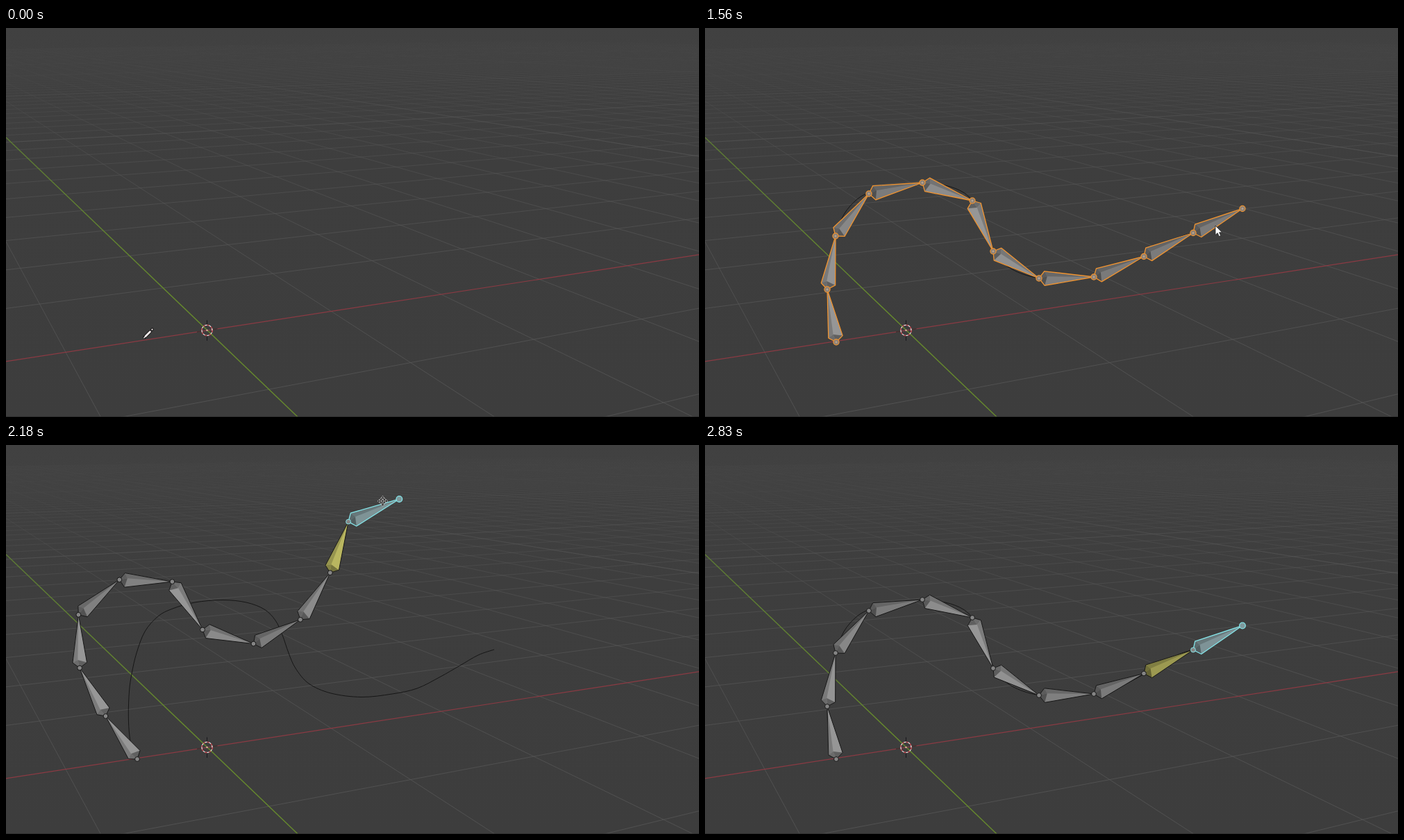
An HTML page that plays this animation: 998x561 px, repeating every 2.92 s.

```html
<!DOCTYPE html>
<html lang="en">
<head>
<meta charset="utf-8">
<title>Rig along curve</title>
<style>
html, body { margin: 0; width: 100%; height: 100%; overflow: hidden; background: #3e3e3e; }
svg { display: block; width: 100vw; height: 100vh; }
#menu text { font: 8.6px Inter, "Open Sans", sans-serif; fill: #e2e2e2; }
#menu .key { fill: #8c8c8c; text-anchor: end; }
#menu .u { text-decoration: underline; }
#menu .icon { fill: none; stroke: #d0d0d0; stroke-width: .9; }
</style>
</head>
<body>
<svg viewBox="0 0 998 561">
  <defs>
    <linearGradient id="sky" x1="0" y1="0" x2="0" y2="1">
      <stop offset="0" stop-color="#414141"/>
      <stop offset=".35" stop-color="#3e3e3e"/>
      <stop offset="1" stop-color="#3d3d3d"/>
    </linearGradient>
    <linearGradient id="fade" gradientUnits="userSpaceOnUse" x1="0" y1="0" x2="0" y2="561">
      <stop offset=".02" stop-color="#565656" stop-opacity="0"/>
      <stop offset=".08" stop-color="#565656" stop-opacity=".08"/>
      <stop offset=".17" stop-color="#565656" stop-opacity=".24"/>
      <stop offset=".3" stop-color="#565656" stop-opacity=".46"/>
      <stop offset=".55" stop-color="#565656" stop-opacity=".68"/>
      <stop offset="1" stop-color="#565656" stop-opacity=".8"/>
    </linearGradient>
    <linearGradient id="green" gradientUnits="userSpaceOnUse" x1="0" y1="158" x2="0" y2="400">
      <stop offset="0" stop-color="#5c7a34"/>
      <stop offset="1" stop-color="#668a2c"/>
    </linearGradient>
  </defs>
  <rect width="998" height="561" fill="url(#sky)"/>
  <g id="grid" fill="none" stroke="url(#fade)"></g>
  <path d="M0 480.8L998 326.9" stroke="#8b3a43" stroke-width="1.2"/>
  <path d="M0 157.8L420.2 561" stroke="url(#green)" stroke-width="1.4"/>
  <rect y="560.2" width="998" height=".8" fill="#2c2c2c"/>
  <g fill="none">
    <path d="M275 438.3L283 437.1M297 434.9L304.5 433.8" stroke="#40302f" stroke-width="1.6"/>
    <path d="M289.5 421.5V429.5M289.5 443V451" stroke="#17171c"/>
    <circle cx="289.5" cy="436" r="7.6" stroke="#f2e6e6" stroke-width="1.3"/>
    <circle cx="289.5" cy="436" r="7.6" stroke="#b03038" stroke-width="1.4" stroke-dasharray="2.985"/>
    <circle cx="289.5" cy="436" r="1.3" fill="#d8a89a"/>
  </g>
  <path id="stroke" fill="none" stroke="#f4f4f4" stroke-width="1.2"/>
  <path id="curve" fill="none"/>
  <g id="bones" stroke-linejoin="round"></g>
  <g id="menu"></g>
  <g id="pointer">
    <circle id="click" cy=".8" r="9.6" fill="#a09822"/>
    <g id="pen" stroke-linecap="round">
      <path d="M1.5 -1.5L9.5 -9.5" stroke="#1c1c1c" stroke-width="4.6"/>
      <path d="M12.3 -12.6L12.6 -12.9" stroke="#1c1c1c" stroke-width="4.2"/>
      <path d="M.8 -.8L3 -3" stroke="#f4eaea" stroke-width="1.4"/>
      <path d="M3 -3L9.5 -9.5" stroke="#f4eaea" stroke-width="2.7"/>
      <path d="M12.3 -12.6L12.6 -12.9" stroke="#f4eaea" stroke-width="2"/>
    </g>
    <path id="arrow" d="M0 0V13.5L3.2 10.6L5.3 15.5L7.7 14.5L5.6 9.8H9.6Z" fill="#fff" stroke="#222" stroke-width=".8"/>
    <g id="mover"></g>
  </g>
</svg>
<script>
const $ = id => document.getElementById(id);
const LOOP = 2920;
const lerp = (a, b, k) => a + (b - a) * Math.max(0, Math.min(1, k));
const show = (id, on) => { $(id).style.display = on ? "" : "none"; };
const pairs = list => list.reduce((out, v, i) => (i % 2 ? out[out.length - 1].push(v) : out.push([v]), out), []);
const poly = pts => "M" + pts.map(p => p.map(v => v.toFixed(2)).join(" ")).join("L");

// Smooth path through points
function smooth(list) {
  const p = pairs(list), at = i => p[Math.max(0, Math.min(p.length - 1, i))];
  let d = "M" + p[0];
  for (let i = 0; i < p.length - 1; i++) {
    const c = [0, 1].map(k => at(i)[k] + (at(i + 1)[k] - at(i - 1)[k]) / 6);
    const e = [0, 1].map(k => at(i + 1)[k] - (at(i + 2)[k] - at(i)[k]) / 6);
    d += `C${c} ${e} ${p[i + 1]}`;
  }
  return d;
}

// Floor grid in perspective
function floor(x, y) {
  const w = .0645 * x + .1622 * y + 1;
  return [(209.05 * x - 27.2 * y + 289.5) / w, (-1.24 * x - .47 * y + 436.2) / w];
}
function drawGrid() {
  let fine = "", bold = "";
  for (let i = -2; i <= 70; i++) {
    const d = (i ? poly([floor(i, -2.6), floor(i, 600)]) + poly([floor(-2.6, i), floor(600, i)]) : "");
    if (i > -2 || d) fine += d;
    if (i && i % 10 === 0) bold += d;
  }
  $("grid").innerHTML = `<path d="${fine}"/><path d="${bold}"/>`;
}

// Context menu: label, shortcut (">" opens a submenu); "-" is a separator
const ITEMS = [
  "Shade Smooth", "_Shade Flat", "-", "Convert _To|>", "_Set Origin|>", "-",
  "_Copy Objects|Ctrl C", "_Paste Objects|Ctrl V", "-",
  "_Duplicate Objects|Shift D", "Duplicate _Linked|Alt D", "-",
  "_Rename Active Object...|F2", "-",
  "_Mirror|>", "S_nap|>", "P_arent|>", "Move to Collection|M", "-",
  "_Insert Keyframe|I", "Insert _Keyframe with Keying Set|K", "-",
  "Delete|X", "Move Along _View|Alt Y", "Rig along C_urve"
];
const ICONS = {
  "_Copy": "M-1 -4H4V4H0M1 -2H3M1 0H3M-5 4L-1 0M-4 0H-1V3",
  "_Paste": "M-4 3V-4H2V0M-2 -2H1M-2 0H0M0 1L4 5M4 2V5H1",
  "_Duplicate O": "M-2 -5H2L4 -3V3H-2ZM-2 -2H-5V5H1V3",
  "Move A": "M-5 2H3M-4 4.5H2M-2 0L-3 5M1 0V5M1.5 -3A1.6 1.6 0 1 1 1.5 -2.9Z"
};
function drawMenu() {
  let y = 3, out = `<rect x="536" y="-10" width="183" height="329" rx="5" fill="#000" opacity=".18"/>
    <rect x="537.3" y="-10" width="180.2" height="327.3" rx="4" fill="#181818" stroke="#262626" stroke-width=".8"/>
    <rect x="539" y="298.6" width="175.5" height="14.8" rx="2.5" fill="#464646"/>`;
  for (const item of ITEMS) {
    if (item === "-") {
      out += `<path d="M543 ${y - 5}H712" stroke="#303030"/>`;
      y += 5.4;
      continue;
    }
    const [label, key] = item.split("|");
    out += `<text x="562" y="${y + 3.1}">${label.replace(/_(.)/, '<tspan class="u">$1</tspan>')}</text>`;
    if (key === ">") out += `<path d="M707.3 ${y - 2.6}V${y + 2.6}L711.8 ${y}Z" fill="#9a9a9a"/>`;
    else if (key) out += `<text class="key" x="706.3" y="${y + 3.1}">${key}</text>`;
    for (const name in ICONS)
      if (label.startsWith(name)) out += `<path class="icon" transform="translate(551 ${y})" d="${ICONS[name]}"/>`;
    y += 15.6;
  }
  out += `<g fill="#f2f2f2"><path d="M548.5 303.5L553.5 308.5" stroke="#f2f2f2" stroke-width="2.4"/>
    <circle cx="547.6" cy="304" r="1.7"/><circle cx="549.2" cy="302.4" r="1.7"/>
    <circle cx="553" cy="309.6" r="1.7"/><circle cx="554.6" cy="308" r="1.7"/></g>`;
  $("menu").innerHTML = out;
}

function drawMover() {
  let out = '<circle r="3.4" fill="#555" stroke="#fff" stroke-width="2.4"/><circle r="3.4" fill="none" stroke="#111" stroke-width="1.3"/>';
  for (let a = 0; a < 360; a += 90)
    out += `<path transform="rotate(${a})" d="M0 -7.4L2.6 -4.2H-2.6Z" fill="#111" stroke="#eee" stroke-width=".6"/>`;
  $("mover").innerHTML = out;
}

// Chain poses as joint positions
const REST = [189,453, 176,377, 188,300, 236,239, 313,223, 385,249, 415,322, 481,361, 560,359, 632,329.5, 703,295.5, 774,260.5];
const LEFT = [189,453, 162,381, 153,303, 181,231, 252,198, 327,212, 366,282, 437,310, 512,290, 573,240, 627,183, 699,149];
const HIGH = [189,453, 181,377, 198,300, 247,239.5, 323,218, 398,232, 445,295, 518,316, 594,296, 660,254, 725,209, 796,174];
const polar = list => pairs(list).slice(1).map((p, i) => {
  const x = p[0] - list[2 * i], y = list[2 * i + 1] - p[1];
  return [Math.atan2(y, x), Math.hypot(x, y)];
});
const [rest, left, high] = [REST, LEFT, HIGH].map(polar);

// Mix of the two bent poses over time: time, left, high
const BEND = [
  [1650, 0, 0], [1690, 0, 0], [1800, -.9, 1.07], [1960, 1, 0], [2100, 2.4, -1],
  [2240, 1.9, .2], [2390, 0, 1], [2480, -.35, 1.1], [2640, 0, 0], [2690, 0, 0]
];
function bend(t) {
  const last = BEND.length - 1;
  if (t <= BEND[0][0] || t >= BEND[last][0]) return [0, 0];
  const i = BEND.findIndex(k => k[0] > t) - 1;
  const at = j => BEND[Math.max(0, Math.min(last, j))];
  const k = (t - at(i)[0]) / (at(i + 1)[0] - at(i)[0]);
  return [1, 2].map(c => {
    const [a, b, d, e] = [at(i - 1)[c], at(i)[c], at(i + 1)[c], at(i + 2)[c]];
    return b + k / 2 * (d - a + k * (2 * a - 5 * b + 4 * d - e + k * (3 * (b - d) + e - a)));
  });
}
function joints([p, q]) {
  let x = REST[0], y = REST[1];
  const out = [[x, y]];
  rest.forEach((r, i) => {
    const [a, l] = [0, 1].map(c => r[c] + p * (left[i][c] - r[c]) + q * (high[i][c] - r[c]));
    out.push([x += Math.cos(a) * l, y -= Math.sin(a) * l]);
  });
  return out;
}

const GREY = [1, 1, 1], YELLOW = [1.27, 1.25, .66], CYAN = [1.03, 1.2, 1.23];
const tone = (v, tint) => `rgb(${tint.map(k => Math.round(v * k))})`;

function bone(a, b, tint, line, width) {
  const dx = b[0] - a[0], dy = b[1] - a[1], len = Math.hypot(dx, dy);
  const at = (u, v) => [a[0] + dx * u - dy / len * v, a[1] + dy * u + dx / len * v];
  const c1 = at(.1, -10), c2 = at(.1, 10.6), mid = at(.15, -2.5);
  const main = 150 - 28 * Math.max(0, Math.cos(Math.atan2(-dy, dx) - .35)) ** 4;
  const face = (pts, v) => `<path d="${poly(pts)}Z" fill="${tone(v, tint)}"/>`;
  return face([a, c1, b, c2], main) + face([c1, mid, b], main * .82) +
    face([a, c1, mid], main * .72) + face([a, mid, c2], main * .64) +
    `<path d="${poly([a, c1, b, c2])}Z" fill="none" stroke="${line}" stroke-width="${width}"/>`;
}
const ball = (p, r, fill, line, w) =>
  `<circle cx="${p[0].toFixed(2)}" cy="${p[1].toFixed(2)}" r="${r}" fill="${fill}" stroke="${line}" stroke-width="${w}"/>`;

function drawBones(pts, posing) {
  const n = pts.length - 1, line = posing ? "#161616" : "#f0932f";
  let out = "";
  for (let i = 0; i < n; i++) {
    const active = posing && i === n - 1;
    const tint = active ? CYAN : posing && i === n - 2 ? YELLOW : GREY;
    out += bone(pts[i], pts[i + 1], tint, active ? "#84e4e8" : line, posing && !active ? 1 : 1.3);
  }
  pts.forEach((p, i) => {
    if (!posing) out += ball(p, 4.1, "#8c8178", line, 1.2) + ball(p, 1.5, "#b9a48c", "none", 0);
    else if (i === n) out += ball(p, 4.3, "#7f999c", "#84e4e8", 1.3);
    else out += ball(p, 3.4, "#858585", i === n - 1 ? "#84e4e8" : line, 1);
  });
  $("bones").innerHTML = out;
}

// Times at which the picture changes
const TICKS = [0];
for (const [a, b, n] of [[40, 560, 14], [600, 760, 5], [1120, 1560, 9], [1650, 2140, 12], [2180, 2690, 13], [2740, 2830, 3]])
  for (let i = 0; i < n; i++) TICKS.push(Math.floor((a + (b - a) * i / (n - 1) + .01) / 10) * 10);

drawGrid();
drawMenu();
drawMover();
$("stroke").setAttribute("d", smooth([189,453, 183,444, 178,420, 176.3,395, 176.5,362, 183,327, 188,303, 196,281, 208,260, 225,244,
  246,234.5, 289,226.5, 337,226, 357,230, 375,239, 390,254, 400,273, 407,298, 414,320, 425,337, 445,352, 470,360, 500,365.3,
  532,365.3, 560,359.5, 590,352, 615,343, 654,322.5, 680,308, 703,297]));
$("curve").setAttribute("d", smooth([189,453, 183,444, 178,420, 176.3,390, 177.5,355, 181,330, 188,300, 200,269, 219,247, 240,236,
  272,227, 312,223.5, 346,227, 372,237, 388,253, 398,274, 407,300, 417,322, 436,344, 468,358, 512,363.5, 556,359, 592,351,
  625,334.5, 653,318.5, 680,303, 703,295]));
const strokeLen = $("stroke").getTotalLength();
$("stroke").setAttribute("stroke-dasharray", `${strokeLen} ${strokeLen + 10}`);

function pointerAt(t, tip, [p, q]) {
  if (t < 40) return ["pen", 198, 447.5];
  if (t < 640) {
    const end = $("stroke").getPointAtLength(drawn(t));
    return ["pen", end.x, end.y];
  }
  if (t < 1170) return ["arrow", lerp(703, 681.5, (t - 600) / 80), lerp(297, 305, (t - 600) / 80)];
  if (t < 1690) return ["arrow", lerp(681.5, 735, (t - 1120) / 440), lerp(305, 285, (t - 1120) / 440)];
  if (t < 2680) return ["mover", tip[0] - 39 + 7 * p + 2.5 * q, tip[1] + 25 - 8 * p + 9 * q];
  if (t < 2830) return ["arrow", lerp(752, 913, (t - 2690) / 90), lerp(373, 545, (t - 2690) / 90)];
  return ["", 0, 0];
}
function drawn(t) {
  return Math.max(0, Math.min(strokeLen, (t - 40) / 480 * (strokeLen - 55.5)));
}

function render(t) {
  const sketch = t >= 40 && t < 600, rigged = t >= 1230, mix = bend(t), pts = joints(mix);
  show("stroke", sketch);
  $("stroke").setAttribute("stroke-dashoffset", strokeLen - drawn(t));
  show("curve", t >= 600);
  $("curve").setAttribute("stroke", rigged ? "#161616" : "#f0962f");
  $("curve").setAttribute("stroke-width", rigged ? 1 : 1.4);
  show("bones", rigged);
  if (rigged) drawBones(pts, t >= 1650);
  show("menu", t >= 720 && t < 1170);

  const [kind, x, y] = pointerAt(t, pts[pts.length - 1], mix);
  for (const id of ["pen", "arrow", "mover"]) show(id, id === kind);
  show("click", sketch || t === 680 || t === 1120);
  $("pointer").setAttribute("transform", `translate(${x.toFixed(2)} ${y.toFixed(2)})`);
}

const start = performance.now();
let shown = -1;
function loop() {
  const now = (performance.now() - start) % LOOP;
  const t = TICKS.filter(v => v <= now).pop();
  if (t !== shown) render(shown = t);
  requestAnimationFrame(loop);
}
loop();
</script>
</body>
</html>
```
